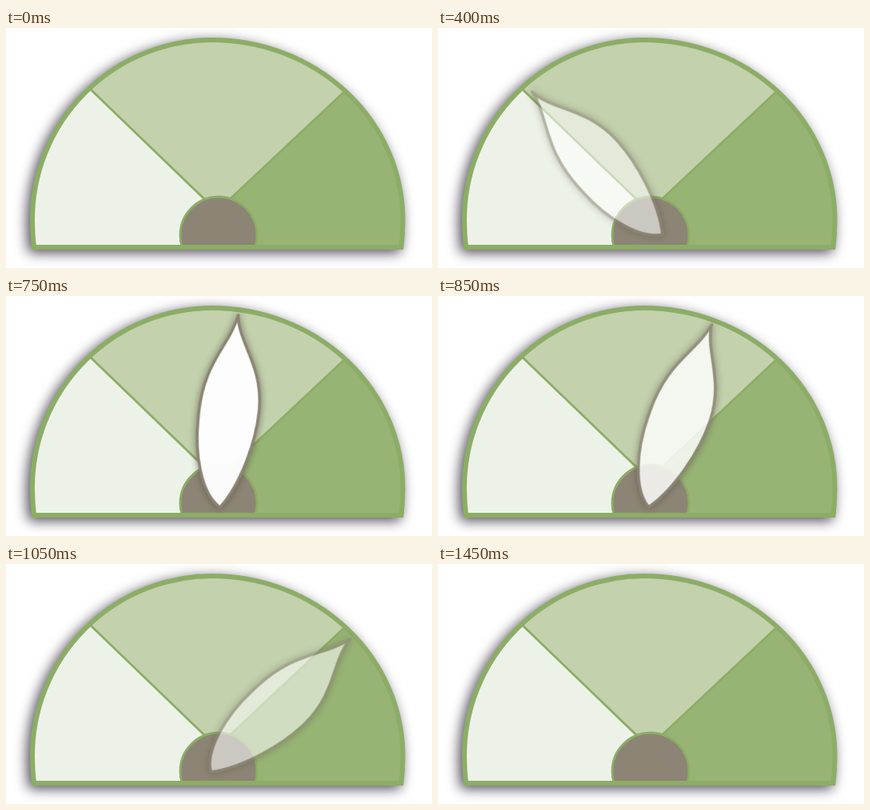
Write an HTML page that moves like this. It is 533x300 px and loops after 1650 ms.

```html
<!DOCTYPE html>
<html lang="en">
<head>
<meta charset="utf-8">
<title>Gauge</title>
<style>
  html, body { margin: 0; width: 100%; height: 100%; overflow: hidden; background: #fff; }
  svg { display: block; width: 100vw; height: 100vh; }
  .dial { filter: drop-shadow(-4px 4px 8px rgba(38, 30, 48, .8)); }
  .line { fill: none; stroke: #8cad66; stroke-width: 2.8; }
  .rim { fill: none; stroke: #8cad66; stroke-width: 6; stroke-linejoin: miter; }
  .leaf {
    fill: #fff; stroke: #8a8373; stroke-width: 3.6; stroke-linejoin: round;
    filter: drop-shadow(0 0 5px rgba(70, 60, 50, .6));
  }
</style>
</head>
<body>
<svg viewBox="0 0 533 300">
  <defs>
    <path id="half" d="M35 274 Q33 257 33 240 A225 225 0 0 1 258 15
      A238.5 225 0 0 1 496.5 240 Q496.5 257 494.5 274 Z"/>
    <clipPath id="inside"><use href="#half"/></clipPath>
  </defs>

  <g class="dial">
    <use href="#half" fill="#edf2e8"/>
    <g clip-path="url(#inside)">
      <path d="M264 229 L106 77 V0 H423 V80 Z" fill="#c3d1ad"/>
      <path d="M264 228 L423 80 L533 0 V280 H264 Z" fill="#98b475"/>
      <path class="line" d="M104 75 L264 229 L425 78"/>
      <circle class="line" cx="266" cy="259" r="48" style="fill:#8c8575"/>
    </g>
    <use href="#half" class="rim"/>
  </g>

  <g id="needle" opacity="0">
    <path class="leaf" d="M0 -224
      C3 -190 37 -165 38.3 -110
      C39 -72 26 -16 2.2 17.6
      C-23 3 -37 -45 -36.5 -92
      C-38 -162 -7 -183 0 -224 Z"/>
  </g>
</svg>
<script>
  const LOOP = 1650, SWEEP = 1450, STEP = 50;
  const START = -96.6, SPEED = 0.1367; // degrees, degrees per ms
  const needle = document.getElementById('needle');
  const t0 = performance.now();

  function draw(now) {
    const time = Math.max(0, now - t0) % LOOP;
    const t = Math.min(SWEEP, Math.floor(time / STEP) * STEP);
    const half = SWEEP / 2;
    needle.setAttribute('transform', `translate(267.5 246.5) rotate(${START + SPEED * t})`);
    needle.setAttribute('opacity', 1 - Math.abs(t - half) / half);
    requestAnimationFrame(draw);
  }
  draw(t0);
</script>
</body>
</html>
```
